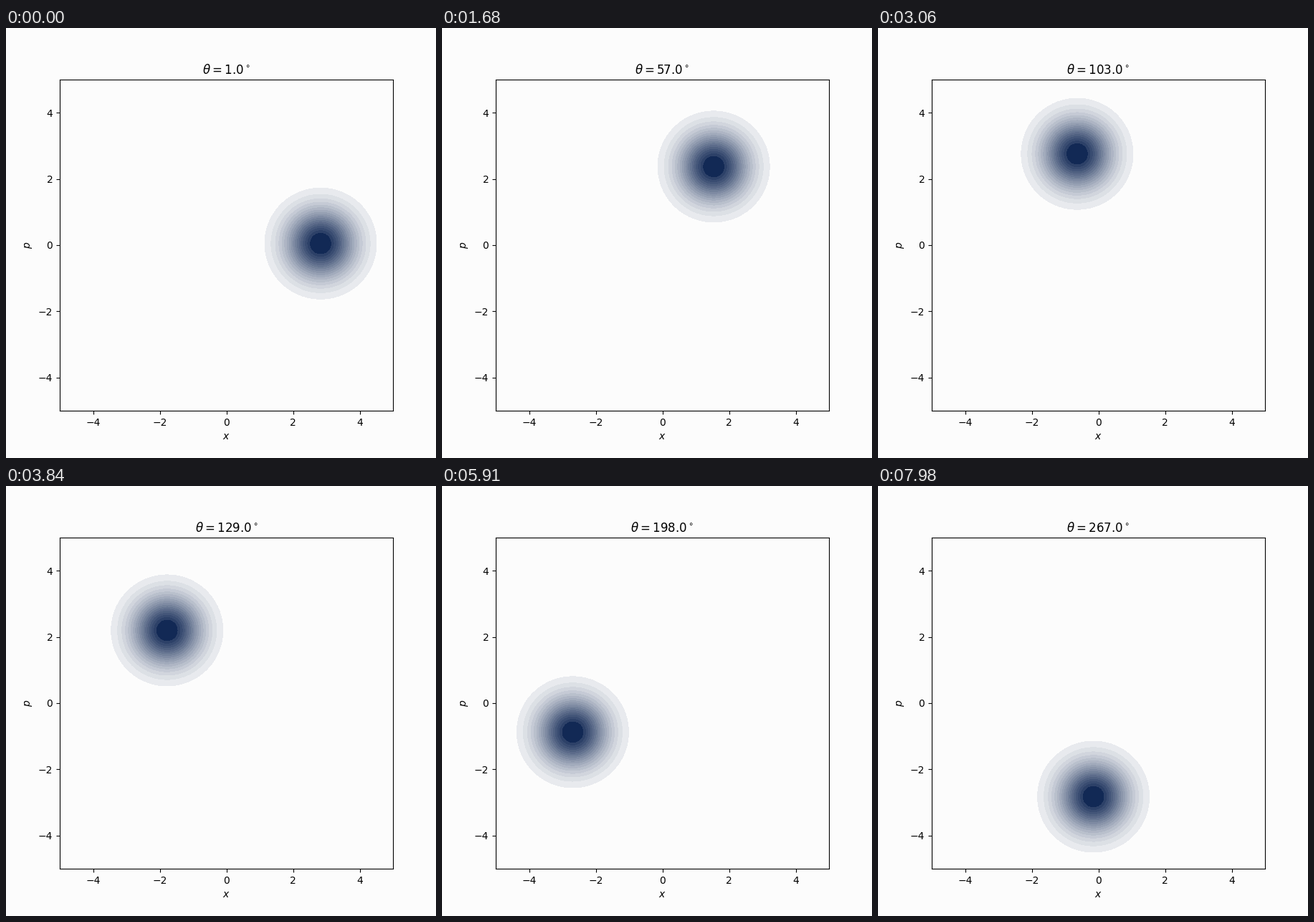
Write a matplotlib script that moves like this. It is 600 px wide and 600 px high and loops after 8 s.

```python
import numpy as np
import matplotlib.pyplot as plt
from matplotlib.animation import FuncAnimation
from matplotlib.patches import Circle

LOOP_MS = 8000
FRAMES = 267
ORBIT = 2 * np.sqrt(2)
PAPER = np.array([252, 252, 252]) / 255
NAVY = np.array([18, 41, 85]) / 255
LEVELS = 0.06 + 0.05 * np.arange(18)

plt.rcParams["font.family"] = "DejaVu Sans"
fig = plt.figure(figsize=(6, 6), dpi=100, facecolor=PAPER)
ax = fig.add_axes([0.125, 0.11, 0.775, 0.77], facecolor=PAPER)
ax.set(xlim=(-5, 5), ylim=(-5, 5))
ticks = [-4, -2, 0, 2, 4]
ax.set_xticks(ticks)
ax.set_yticks(ticks)
ax.set_xlabel("$x$")
ax.set_ylabel("$p$")
title = ax.set_title("")


def make_band(level):
    """Filled contour of exp(-r^2) at the given height."""
    mix = 1 if level == LEVELS[-1] else level + 0.025
    disc = Circle((0, 0), np.sqrt(-np.log(level)), lw=0,
                  fc=PAPER + (NAVY - PAPER) * mix, antialiased=False)
    return ax.add_patch(disc)


bands = [make_band(level) for level in LEVELS]


def update(i):
    degrees = i + 1
    theta = np.radians(degrees)
    center = ORBIT * np.cos(theta), ORBIT * np.sin(theta)
    for band in bands:
        band.center = center
    title.set_text(rf"$\theta = {degrees:.1f}^\circ$")
    return [*bands, title]


anim = FuncAnimation(fig, update, frames=FRAMES, interval=LOOP_MS / FRAMES,
                     init_func=lambda: update(0), repeat=True,
                     repeat_delay=0, blit=False)
plt.show()
```
